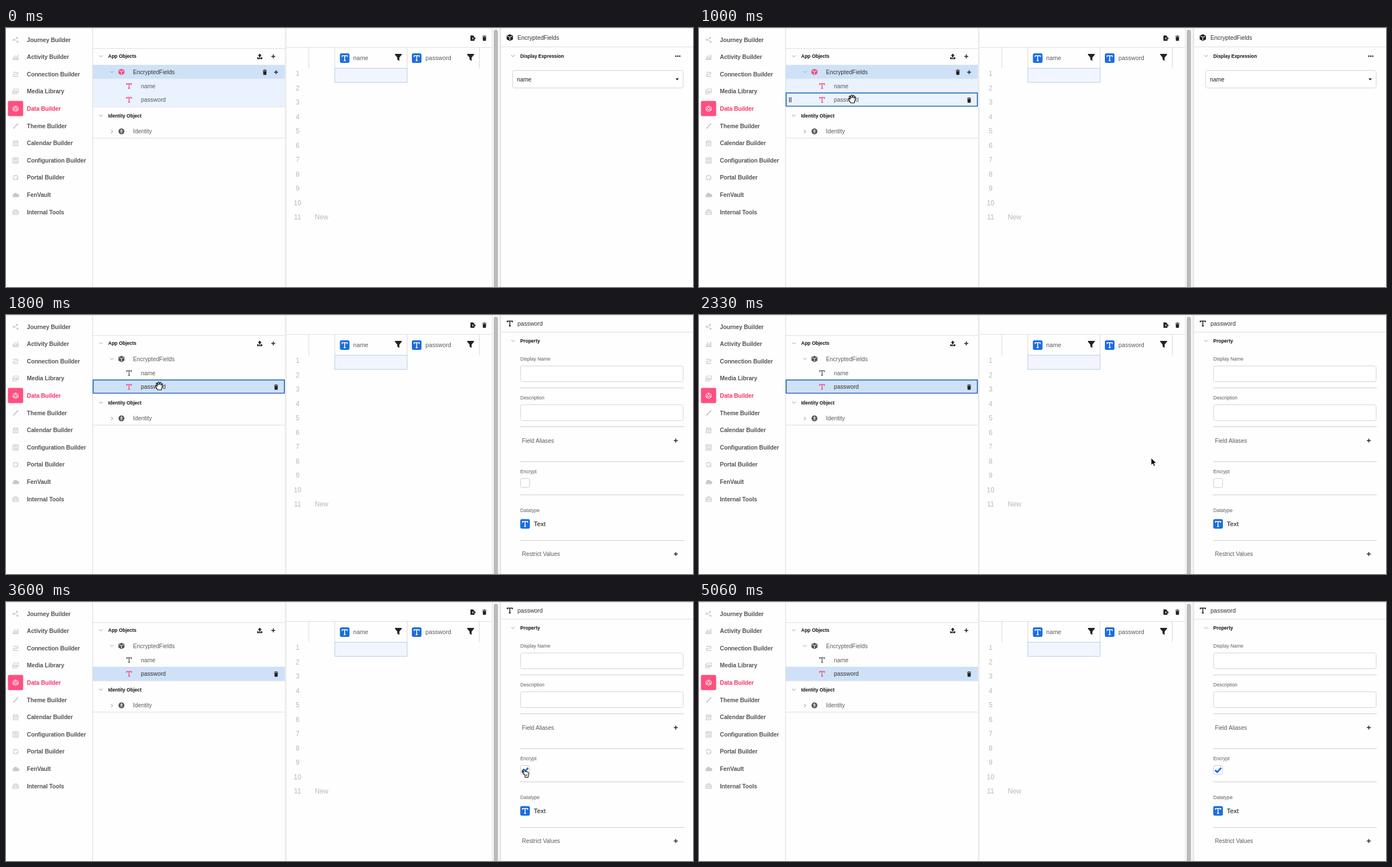
An HTML page that plays this animation: 1217x460 px, repeating every 5.53 s.

```html
<!DOCTYPE html>
<html lang="en">
<head>
<meta charset="utf-8">
<title>Data builder: encrypt a field</title>
<style>
  html, body { margin: 0; width: 100%; height: 100%; overflow: hidden; background: #fdfefd; }
  svg { display: block; width: 100%; height: 100%; font-family: "Liberation Sans", Arial, sans-serif; }
</style>
</head>
<body>
<svg id="stage" viewBox="0 0 1217 460" xmlns="http://www.w3.org/2000/svg"></svg>
<script>
const LOOP = 5530, FRAME = 1000 / 15;
const BLUE = '#1b6de0', PINK = '#ff4f81', TREE_PINK = '#ee4f80', INK = '#222', GREY = '#5c5c5c';

// Drawing helpers: texts are placed by their vertical centre.
const text = (x, cy, s, size = 10.3, fill = GREY, extra = '') =>
  `<text x="${x}" y="${cy + size * .35}" font-size="${size}" fill="${fill}" ${extra}>${s}</text>`;
const bold = (x, cy, s, size = 8.5, fill = '#111') => text(x, cy, s, size, fill, 'font-weight="700"');
const rect = (x, y, w, h, fill, extra = '') =>
  `<rect x="${x}" y="${y}" width="${w}" height="${h}" fill="${fill}" ${extra}/>`;
const path = (d, stroke, width = 1, fill = 'none') =>
  `<path d="${d}" stroke="${stroke}" stroke-width="${width}" fill="${fill}"/>`;
const shape = (d, fill) => `<path d="${d}" fill="${fill}"/>`;
const hline = (x, y, x2, color = '#dedede') => path(`M${x} ${y}H${x2}`, color);
const vline = (x, y, y2, color = '#dedede') => path(`M${x} ${y}V${y2}`, color);
const at = (x, y, content, scale = 1) => `<g transform="translate(${x} ${y}) scale(${scale})">${content}</g>`;
const group = (id, content) => `<g id="${id}">${content}</g>`;

// Icons centred on their own origin
const slabT = color => path('M-4.3 -1.8V-4H4.3V-1.8M0 -4V4.4M-1.7 4.2H1.7', color, 1.5);
const textTile = (x, y, size) =>
  rect(x - size / 2, y - size / 2, size, size, BLUE, 'rx="3"') + at(x, y, slabT('#fff'), size / 16);
const cube = color => shape('M0 -5.6L5.3 -3.2V3.1L0 5.8L-5.3 3.1V-3.2Z', color) +
  path('M-4 -2.4L0 -.5L4 -2.4M0 -.5V4.5', '#fff', 1);
const trash = shape('M-3.8 -4H-1.5L-1 -5H1L1.5 -4H3.8V-2.8H-3.8ZM-3.2 -2H3.2L2.8 5H-2.8Z', INK);
const plus = path('M-3.5 0H3.5M0 -3.5V3.5', INK, 1.5);
const down = path('M-3 -1.5L0 1.5L3 -1.5', '#999', 1);
const right = path('M-1.5 -3L1.5 0L-1.5 3', '#888', 1);
const funnel = shape('M-6 -6H6V-4.5L1.8 .5V6.5L-1.8 4V.5L-6 -4.5Z', INK);
const upload = shape('M0 -5L3.5 -1H1.2V2H-1.2V-1H-3.5ZM-4.5 1.5H-2.3V3H2.3V1.5H4.5V4.8H-4.5Z', INK);
const exporter = shape('M-4.5 -5H.5L3 -2.3V-1H-1V2H3V5H-4.5ZM2.5 -2.5L5.5 .5L2.5 3.5V1.5H0V-.5H2.5Z', INK);
const person = '<circle r="5.2" fill="#555"/><circle cy="-2.6" r="1" fill="#fff"/>' +
  path('M-2.6 -.8H2.6M-.8 -.8V3.4M.8 -.8V3.4', '#fff', .8);

const pale = '#c9c9c9';
const menu = [
  ['Journey Builder', shape('M-5 -1.5H-2V1.5H-5ZM1 -5H4V-2H1ZM2 2H5V5H2Z', pale) + path('M-2 0L2 -3M-2 0L3 3', pale)],
  ['Activity Builder', path('M-4 4V0M-1.5 4V-3M1.5 4V-1M4 4V-4M-5 4.5H5', pale, 1.5)],
  ['Connection Builder', path('M-4.5 -3.5H2Q4 -3.5 4 -1.5T2 0H-2Q-4 0 -4 2T-2 3.8H4.5', pale, 1.4)],
  ['Media Library', path('M-3 -4.5H5V2H-3ZM-5 -2V4.5H3', pale, 1.2) + shape('M-2 1L1 -2L4 1Z', pale)],
  ['Data Builder', path('M0 -5L4.6 -2.5V2.5L0 5L-4.6 2.5V-2.5Z', '#fff', 1) +
    '<circle r="2.2" fill="none" stroke="#fff"/>' + path('M0 -5V-2M-4.6 2.5L-2 1M4.6 2.5L2 1', '#fff', .9)],
  ['Theme Builder', path('M4.5 -4.5L-1 1', pale, 2.2) + shape('M-2.5 .5L0 3Q-2 5 -5 4.7Q-3.5 3.5 -2.5 .5Z', pale)],
  ['Calendar Builder', path('M-4 -3.5H4V4.5H-4ZM-2 -5V-3M2 -5V-3M-4 -1H4M-2 1.8H2', pale, 1.3)],
  ['Configuration Builder', path('M-4.5 -4.5H4.5V4.5H-4.5ZM-3 -1.7H3M-3 1.7H3M-1 -3V-.5M1 .5V3', pale, 1.3)],
  ['Portal Builder', '<circle r="4.2" fill="none" stroke="#c9c9c9" stroke-width="1.3" stroke-dasharray="5.6 1"/>' +
    path('M-2 -3.5L1 -3M3 0L2 3M-3 1L-1 3', pale)],
  ['FenVault', shape('M-4 4A3 3 0 0 1 -4 -1A4 4 0 0 1 3 -2A3 3 0 0 1 4 4Z', pale)],
  ['Internal Tools', path('M-4.8 -2H4.8V4H-4.8ZM-2 -2V-4.3H2V-2M-4.8 1H4.8M-2 0V2M2 0V2', pale, 1.2)]
];

const sidebar = rect(3.4, 129.5, 27, 27, PINK, 'rx="2.5"') + menu.map(([label, icon], i) => {
  const y = 20.9 + i * 30.62;
  return at(17, y, icon) + text(37, y, label, 10.35, i === 4 ? '#f9336d' : '#565656',
    'font-weight="700" letter-spacing="-.08"');
}).join('') + vline(153.5, 0, 460, '#d9d9d9');

const tree =
  hline(154, 36.5, 494) + at(168, 50, down) + bold(181, 50.5, 'App Objects') +
  at(449.5, 50.5, upload) + at(473.5, 50.5, plus) +
  group('objectSelected',
    rect(154, 65.5, 340, 25, '#cfe1f7') + rect(154, 90.5, 340, 49, '#e9f2fd') +
    at(204.5, 78, cube(TREE_PINK)) + text(225, 78, 'EncryptedFields', 10.3, '#333') +
    at(458.5, 78.5, trash, .95) + at(478.5, 78.5, plus) +
    at(218, 103, slabT(TREE_PINK)) + text(239, 127.5, 'password')) +
  group('fieldSelected',
    rect(154, 115, 340, 25, '#cfe1f7') + at(204.5, 78, cube('#555')) +
    text(225, 78, 'EncryptedFields') + at(218, 103, slabT('#666')) + text(239, 127.5, 'password', 10.3, '#333')) +
  at(187.5, 78, down) + text(239, 103, 'name') + at(218, 127.5, slabT(TREE_PINK)) +
  group('fieldTrash', at(478.5, 0, trash, .95)) +
  group('grip', path('M160.2 -4.5V4.5M163 -4.5V4.5', '#333', 1.2)) +
  rect(154.4, 0, 338.8, 23.5, 'none', 'id="outline" stroke="#1f66b8" stroke-width="1.7"') +
  hline(154, 140, 494) + at(168, 155.5, down) + bold(181, 156, 'Identity Object') +
  at(187.5, 184, right) + at(204.5, 183.5, person) + text(225, 183.5, 'Identity', 10.4) +
  hline(154, 195.5, 494);

const rowNumbers = Array.from({ length: 11 }, (_, i) =>
  text(516.5, 81 + i * 25.5, i + 1, 12, '#b9b9b9', 'text-anchor="middle"')).join('');
const grid =
  rect(494, 0, 3, 460, '#ececec') + hline(497, 34.5, 861) +
  at(827, 18, exporter, .95) + at(847.5, 18, trash, .95) +
  [536.5, 582.5, 710.5, 838.5].map(x => vline(x, 35, 71.5, '#d8d8d8')).join('') +
  textTile(600, 53.5, 17) + text(615, 53.5, 'name', 10.7) + at(695, 52, funnel) +
  textTile(727.5, 53.5, 17) + text(743, 53.5, 'password', 10.7) + at(823, 52, funnel) +
  rect(582.5, 71.5, 128, 25, '#f0f5ff', 'stroke="#b9cceb"') +
  rowNumbers + text(547, 336, 'New', 12, '#b9b9b9') +
  vline(861.5, 0, 460) + rect(864, 3, 7.5, 470, '#bababa', 'rx="3.7"') +
  rect(873, 0, 3.5, 460, '#efefef') + vline(876.5, 0, 460, '#dcdcdc');

const inputBox = (x, y, h) => rect(x, y, 1199.5 - x, h, '#fff', 'stroke="#d3d3d3" rx="3"');
const objectPanel =
  at(892.5, 17, cube(INK), 1.05) + text(906, 17, 'EncryptedFields', 10.3, '#333') + hline(877, 33.5, 1217) +
  at(898, 49.5, down) + bold(911, 50, 'Display Expression', 8.4) +
  [1186.5, 1190, 1193.5].map(x => `<circle cx="${x}" cy="50" r="1.3" fill="#222"/>`).join('') +
  inputBox(897.5, 75.5, 31) + text(905, 91, 'name', 10.3, INK) + shape('M1186 89.5H1192L1189 93Z', INK);

const divider = y => `<path d="M911 ${y}H1200" stroke="#999" stroke-dasharray="1 1"/>`;
const label = (y, s) => text(911, y, s, 8.55);
const fieldPanel =
  at(892.5, 15, slabT(INK), 1.05) + text(906, 15, 'password', 10.5, '#333') + hline(877, 30.5, 1217) +
  at(898, 46, down) + bold(911, 46.5, 'Property') +
  label(78, 'Display Name') + inputBox(911.5, 90.5, 28) +
  label(147, 'Description') + inputBox(911.5, 159.5, 28) +
  [129.5, 198.5, 260.5, 319.5, 400.5].map(divider).join('') +
  text(914, 223, 'Field Aliases', 10.15) + at(1186.5, 223, plus) +
  label(278, 'Encrypt') + rect(911.5, 290.5, 16, 16, '#fff', 'id="checkbox" rx="3"') +
  group('check', path('M914.3 298.6L918 302.2L925 294.6', BLUE, 3)) +
  label(347, 'Datatype') + textTile(919.5, 371, 17) + text(935, 371, 'Text', 11.4, '#111') +
  text(914, 424.5, 'Restrict Values', 10.15) + at(1186.5, 424.5, plus);

const arrow = '<path d="M0 0V12.5L2.9 9.9L4.9 14.6L7 13.7L5 9.1H9Z" fill="#000" stroke="#fff" stroke-width=".8"/>';
const openHand = path('M-2.5 7L-6 1Q-7 -1.5 -5 -1L-3 .8L-5 -4Q-4.5 -6 -3 -4.5L-1.5 -1L-2 -6Q-.6 -8 .5 -6L1 -1.5' +
  'L2 -6Q3.6 -7 4 -5L3.6 -.8L5 -3.5Q7 -4.2 6.6 -2L5 3.5L4 7Z', '#000', 1.1, '#fff');
const pointer = path('M1.7 9.5L-2.6 5.7Q-3.6 3.7 -1.5 4.2L.2 5.6L-1 1Q-.4 -1 1.2 .4L2.4 4Q4 3 4.7 4.5Q6.3 3.7 7 5.2' +
  'Q8.7 5 9 7L8.8 11L7.6 14.5H2.8Z', '#000', 1.1, '#fff') + path('M4 9V12M6 9V12', '#000', .8);

document.getElementById('stage').innerHTML =
  rect(0, 0, 1217, 460, '#fdfefd') + sidebar + tree + grid +
  group('objectPanel', objectPanel) + group('fieldPanel', fieldPanel) + hline(0, .5, 1217, '#e3e3e3') +
  group('cursor', group('arrow', arrow) + group('openHand', openHand) + group('pointer', pointer));

const el = id => document.getElementById(id);
const show = (id, on) => el(id).setAttribute('display', on ? 'inline' : 'none');
const between = (t, a, b) => t >= a && t < b;

// Pointer route: time, x, y
const route = [
  [60, 330, 462], [530, 286, 76], [640, 282, 82], [730, 274, 101], [990, 271, 126], [1860, 271, 126],
  [2330, 801, 254], [2680, 911, 295], [3000, 911, 295], [3250, 917, 297], [4340, 917, 297], [4660, 950, 458]
];
function pointerAt(t) {
  const i = Math.max(1, route.findIndex(p => p[0] >= t));
  const [t0, x0, y0] = route[i - 1], [t1, x1, y1] = route[i];
  const k = Math.min(1, Math.max(0, (t - t0) / (t1 - t0))), e = k * k * (3 - 2 * k);
  return [x0 + (x1 - x0) * e, y0 + (y1 - y0) * e];
}

function render(t) {
  const selected = t >= 1660, checked = t >= 3330;
  const onField = between(t, 990, 1925), onCheckbox = between(t, 2660, 4460);
  const nameHover = between(t, 790, 990);
  const rowY = t < 790 ? 66.3 : nameHover ? 90.8 : 115.4;

  show('objectSelected', !selected);
  show('fieldSelected', selected);
  show('objectPanel', !selected);
  show('fieldPanel', selected);

  show('outline', between(t, 590, 3260));
  el('outline').setAttribute('y', rowY);
  show('fieldTrash', t >= 790);
  el('fieldTrash').setAttribute('transform', `translate(0 ${nameHover ? 103 : 128})`);
  show('grip', between(t, 790, 1660));
  el('grip').setAttribute('transform', `translate(0 ${nameHover ? 103 : 127.5})`);

  show('check', checked);
  el('checkbox').setAttribute('stroke', between(t, 2660, 3330) ? '#9bbfeb' : '#cbcbcb');

  const visible = between(t, 60, 4655);
  show('cursor', visible);
  if (visible) el('cursor').setAttribute('transform', `translate(${pointerAt(t).join(' ')})`);
  show('openHand', onField);
  show('pointer', onCheckbox);
  show('arrow', !onField && !onCheckbox);
}

const start = performance.now();
function tick() {
  const t = (performance.now() - start) % LOOP;
  render(Math.floor((t + 7) / FRAME) * FRAME);
  requestAnimationFrame(tick);
}
tick();
</script>
</body>
</html>
```
